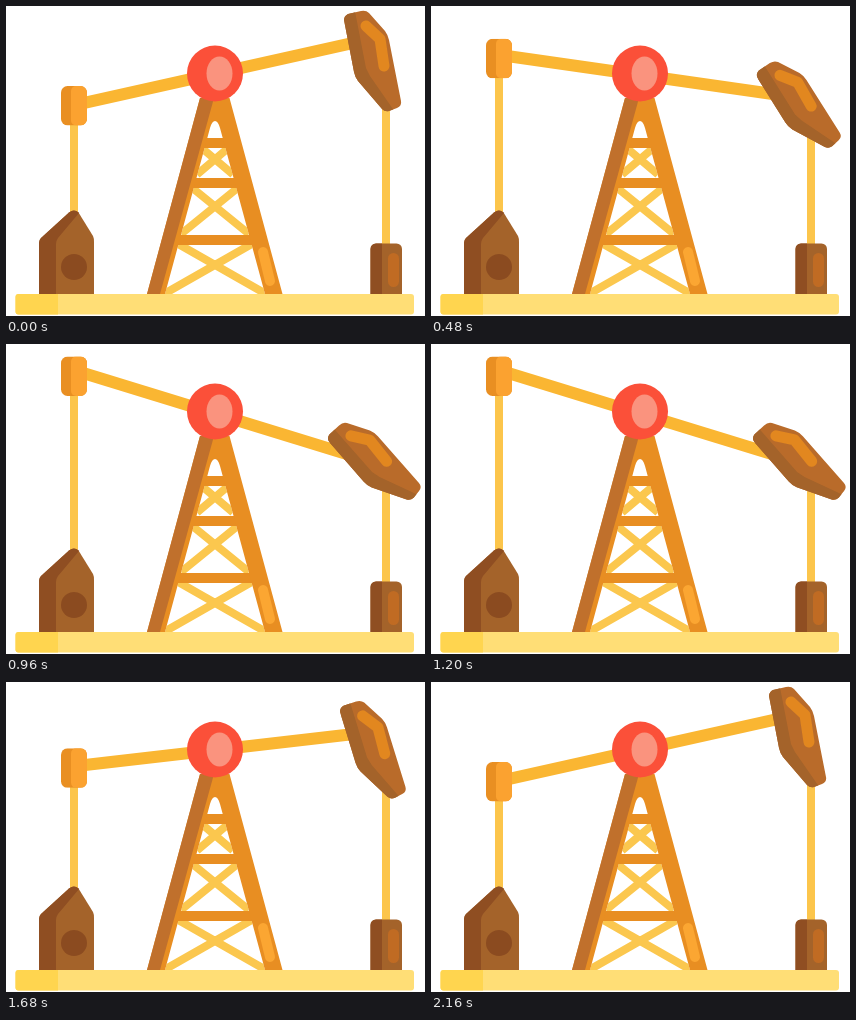
An HTML page for the animation above (2280 ms loop, 419 by 310 pixels).

```html
<!DOCTYPE html>
<html lang="en">
<head>
<meta charset="utf-8">
<title>Pump jack</title>
<style>
  html, body { margin: 0; width: 100%; height: 100%; overflow: hidden; background: #fff; }
  svg { display: block; width: 419px; height: 310px; }
</style>
</head>
<body>
<svg viewBox="0 0 419 310">
  <defs>
    <clipPath id="opening"><path d="M204 122L159 288H259L214 122Z"/></clipPath>
    <clipPath id="ground"><rect x="9.5" y="288" width="398.5" height="20.5" rx="3"/></clipPath>
    <clipPath id="postShape"><path d="M364.5 288V243a5.5 5.5 0 0 1 5.5-5.5H390.5a5.5 5.5 0 0 1 5.5 5.5V288Z"/></clipPath>
    <clipPath id="blockShape"><rect x="55" width="26" height="39.5" rx="6.5"/></clipPath>
    <clipPath id="houseShape"><path d="M33 288V237Q33 234 35 232L63 206.500Q68 202.500 72.500 206.500L87 230Q88 232 88 236V288Z"/></clipPath>
    <clipPath id="headShape"><path d="M338 14Q338 10 342 8L355 5Q360 4 363 7L379 25Q382 29 383 34L395 95Q396 100 391 102L383 105Q379 106 376 103L352 75Q349 71 348 66Z"/></clipPath>
  </defs>

  <!-- rods and beam -->
  <path id="leftRod" stroke="#fcc54b" stroke-width="8"/>
  <path id="rightRod" stroke="#fcc54b" stroke-width="8"/>
  <rect id="beam" x="-136" y="-6" width="286" height="12" fill="#fab632"/>

  <!-- tower -->
  <g clip-path="url(#opening)" stroke="#fbc74e" stroke-width="8">
    <path d="M191 138L227 168.500M227 138L191 168.500"/>
    <path d="M179 176L243 228M239 176L175 228"/>
    <path d="M167 235L260 288M251 235L158 288"/>
  </g>
  <path fill="#e88e22" d="M189 132H229V142H189ZM180 172H238V182H180ZM168 229H250V239H168Z"/>
  <path fill="#e88e22" d="M194 92H223.500L276.500 288H259L214 122Q212 115 209 115T204 122L159 288H141Z"/>
  <path fill="#c0702c" d="M194 92H208L154 288H141Z"/>
  <path d="M257 246L264 275" stroke="#fba632" stroke-width="10" stroke-linecap="round"/>

  <!-- pivot -->
  <circle cx="209" cy="67.5" r="28" fill="#fb5039"/>
  <ellipse cx="213.5" cy="67.5" rx="13" ry="17" fill="#fa937e"/>

  <g id="block" clip-path="url(#blockShape)">
    <rect x="55" width="26" height="39.5" fill="#e98f22"/>
    <rect x="65" width="16" height="39.5" rx="5" fill="#fba230"/>
  </g>

  <g id="head" clip-path="url(#headShape)">
    <rect x="330" width="70" height="110" fill="#b96b2a"/>
    <path fill="#a4632a" d="M330 0H348L360 62L364 70L389 106L375 110L330 80Z"/>
    <path d="M360 20L374 33L378 60" fill="none" stroke="#e2871f" stroke-width="11" stroke-linecap="round" stroke-linejoin="round"/>
  </g>

  <!-- housing, well post, ground -->
  <g clip-path="url(#houseShape)">
    <rect x="33" y="200" width="55" height="88" fill="#a4632a"/>
    <path fill="#8f4e22" d="M33 288V200H76L73 207L52 232Q50 235 50 238V288Z"/>
    <circle cx="68" cy="261" r="13" fill="#8b4b20"/>
  </g>
  <g clip-path="url(#postShape)">
    <rect x="364" y="237" width="32" height="51" fill="#a4632a"/>
    <rect x="364" y="237" width="12" height="51" fill="#8f4e22"/>
    <rect x="382" y="247" width="11" height="34" rx="5.5" fill="#c06b23"/>
  </g>
  <g clip-path="url(#ground)">
    <rect x="9" y="288" width="400" height="21" fill="#ffde76"/>
    <rect x="9" y="288" width="43" height="21" fill="#ffd54f"/>
  </g>
</svg>
<script>
  const LOOP = 2280, STEP = 120, STROKE = 1000, RISE = 72, FALL = 1184;
  const part = id => document.getElementById(id);
  const set = (id, name, value) => part(id).setAttribute(name, value);

  const bezier = (a, b, s) => 3 * a * s * (1 - s) ** 2 + 3 * b * s * s * (1 - s) + s ** 3;

  // cubic-bezier(.25, .1, .25, 1), solved by bisection
  function ease(x) {
    if (x <= 0) return 0;
    if (x >= 1) return 1;
    let lo = 0, hi = 1;
    for (let i = 0; i < 24; i++) {
      const mid = (lo + hi) / 2;
      if (bezier(.25, .25, mid) < x) lo = mid; else hi = mid;
    }
    return bezier(.1, 1, lo);
  }

  function pose(t) {
    const p = ease((t - RISE) / STROKE) - ease((t - FALL) / STROKE);
    const blockY = 80 - 68 * p, drop = 63.5 * p;
    set('block', 'transform', `translate(0 ${blockY})`);
    set('leftRod', 'd', `M68 ${blockY + 20}V215`);
    set('beam', 'transform', `translate(205.5 68.5) rotate(${-12.6 + 29.9 * p})`);
    set('head', 'transform', `translate(${1.5 * p} ${drop}) rotate(${-30.5 * p} 368 55)`);
    set('rightRod', 'd', `M380 ${75 + drop}V245`);
  }

  const start = performance.now();
  function tick() {
    const t = (performance.now() - start) % LOOP;
    pose(Math.floor(t / STEP) * STEP);
    requestAnimationFrame(tick);
  }
  tick();
</script>
</body>
</html>
```
